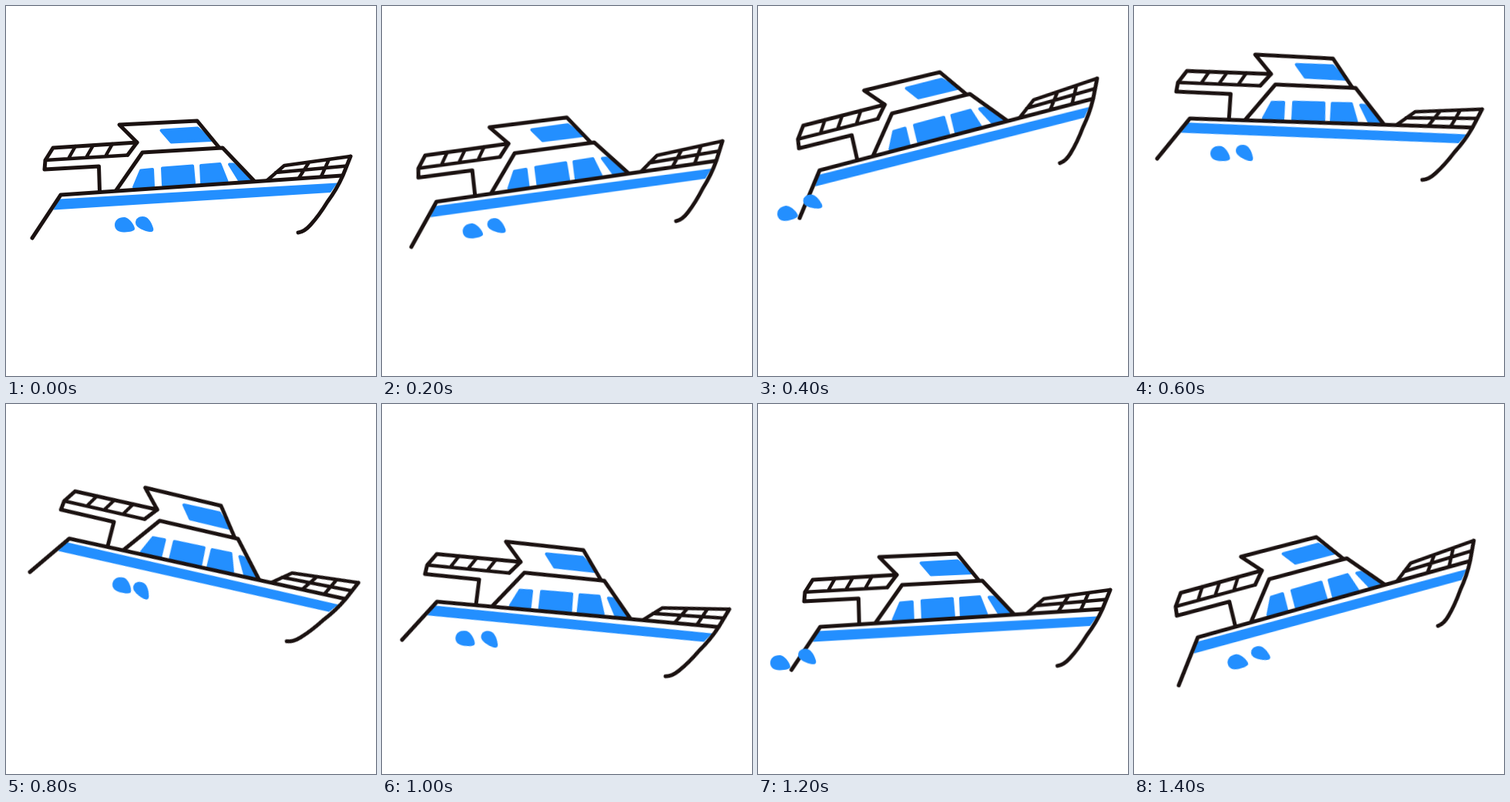
These frames come from a looping animation (480x480 px, 1.6 s). An HTML page:

```html
<!DOCTYPE html>
<html lang="en">
<head>
<meta charset="utf-8">
<title>Rocking yacht</title>
<style>
  html, body { margin: 0; width: 100%; height: 100%; overflow: hidden; background: #fff; }
  svg { display: block; width: 100%; height: 100%; }

  .line { fill: none; stroke: #1b1211; stroke-width: 5; stroke-linecap: round; stroke-linejoin: round; }
  .thin { stroke-width: 4.4; }
  .blue { fill: #238fff; }
  .glass { stroke: #238fff; stroke-width: 4; stroke-linejoin: round; }

  .boat { transform-origin: 240px 225px; animation: rock 1.6s step-end infinite; }
  .drop { animation: drift .8s step-end infinite; }
  .a { --mid: translate(-39px, 2.5px); --far: translate(-134.6px, 8px); }
  .b { --mid: translate(-33.5px, -1px); --far: translate(-125.4px, .5px); }

  @keyframes rock {
    0%    { transform: translate(0, 0) rotate(0deg); }
    12.5% { transform: translate(-2.4px, -4px) rotate(-4.4deg); }
    25%   { transform: translate(2.2px, -63px) rotate(-10.75deg); }
    37.5% { transform: translate(2.6px, -82px) rotate(5.75deg); }
    50%   { transform: translate(10px, -22.3px) rotate(16.25deg); }
    62.5% { transform: translate(1.4px, 38.3px) rotate(9.05deg); }
    75%   { transform: translate(9.8px, 45px) rotate(.3deg); }
    87.5% { transform: translate(4.2px, 23.7px) rotate(-11.75deg); }
    100%  { transform: translate(0, 0) rotate(0deg); }
  }
  @keyframes drift {
    0%   { transform: translate(0, 0); }
    25%  { transform: var(--mid); }
    50%  { transform: var(--far); }
    75%  { transform: var(--mid); }
    100% { transform: translate(0, 0); }
  }
</style>
</head>
<body>
<svg viewBox="0 0 480 480">
  <g class="boat">
    <!-- stripe and windows -->
    <path class="blue" d="M69 250.5L430 229.5L421 242L61.5 264.5Z"/>
    <g class="blue glass">
      <path d="M201.5 161.5L248.5 158.5L266 174L214.5 176.5Z"/>
      <path d="M166 235L175 213.500L190 212L191 234Z"/>
      <path d="M203 210.500L242 207.500L244 230L204 232.500Z"/>
      <path d="M253 207L277.500 205L286.500 227.500L254 229.500Z"/>
      <path d="M290 205.500L295 205.500L317 226L303 226.500Z"/>
    </g>

    <!-- hull -->
    <path class="line" d="M34 301L71 245L436 220"/>
    <path class="line" d="M447 195L437 220Q429 238 417 254Q406 272 395 284Q387 293 379 294"/>

    <!-- cabin and flybridge -->
    <path class="line" d="M143 239L177 190L281 184L322 227"/>
    <path class="line" d="M158 193L170 177L147 154L248 149L276 183"/>
    <path class="line" d="M170 177L61 184L51 200L50 212L120.500 208L121.500 240"/>
    <path class="line thin" d="M51 200L158 193.500M90 182L81 198M113 181L104 196.500M138 179L129 195"/>

    <!-- bow rail -->
    <path class="line thin" d="M339 226L361 207L447 195M350 216L442 207.500M393 203L380 223M419 199L409 221"/>

    <path class="blue drop a" d="M141 284C141 278 146 274 153 274C160 274 167 285 167 289C167 292 161 293 154 293.500C146 294 141 290 141 284Z"/>
    <path class="blue drop b" d="M168 281C168 276 172 273 177 273C184 273 188 279 191 288C192 292 190 293.500 186 293C180 292 168 288 168 281Z"/>
  </g>
</svg>
</body>
</html>
```
